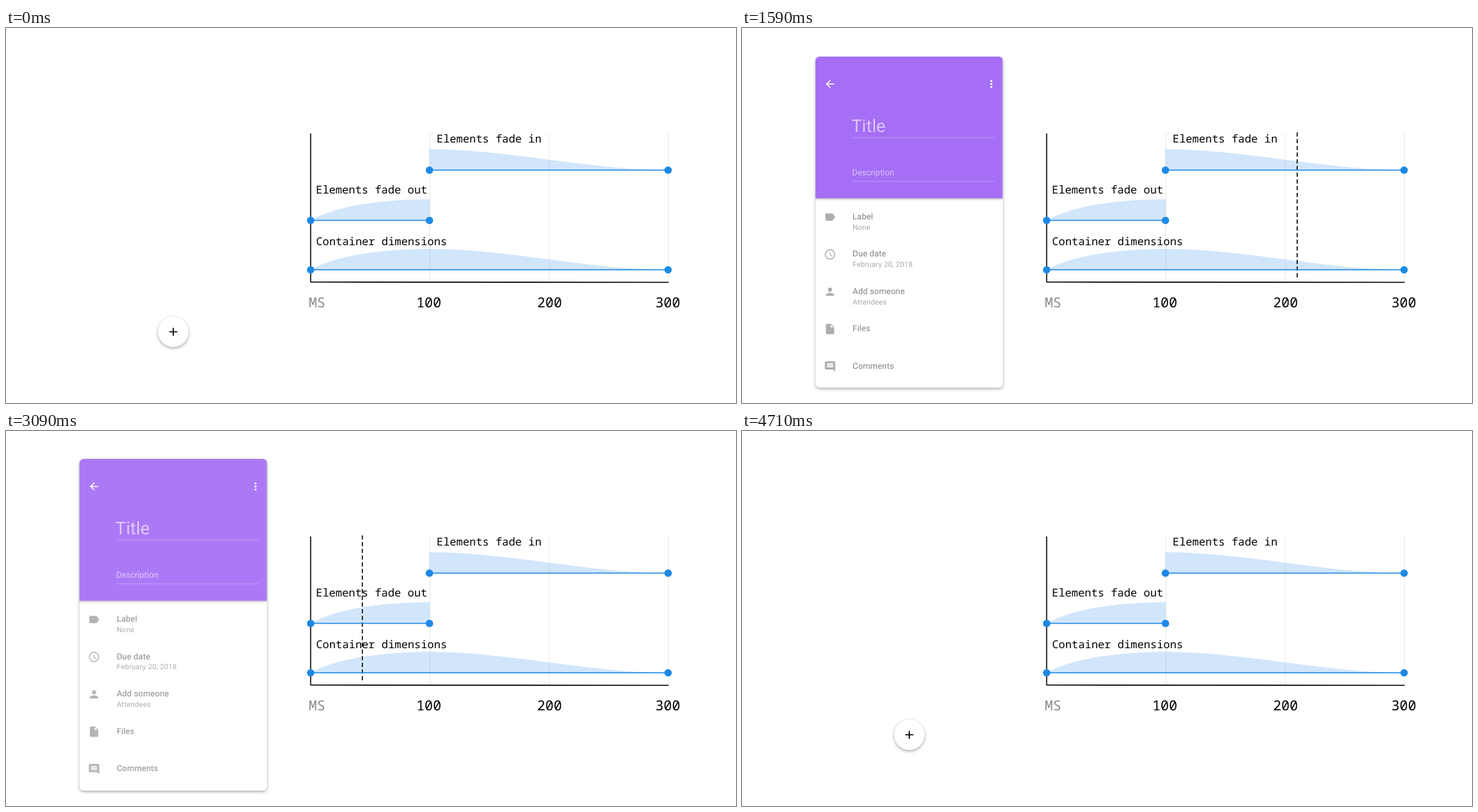
Write an HTML page that moves like this. It is 1043x537 px and loops after 4860 ms.

```html
<!DOCTYPE html>
<html lang="en">
<head>
<meta charset="utf-8">
<title>Container transform timing</title>
<style>
  html, body { margin: 0; width: 100%; height: 100%; overflow: hidden; background: #fff; }
  svg { display: block; text-rendering: geometricPrecision; }
  #chart { position: absolute; left: 0; top: 0; }
  #chart text { font: 15.6px "Roboto Mono", "Noto Sans Mono", monospace; }
  #chart .tick text { font-size: 19.8px; }
  #card {
    position: absolute; overflow: hidden; background: #fff;
    box-shadow: 0 2px 4px rgba(0,0,0,.3), 0 0 2px rgba(0,0,0,.12);
  }
  #page { position: absolute; left: 0; top: 0; width: 100%; }
  #page text { font: 16px Roboto, sans-serif; }
  #page .main { fill: #212121; letter-spacing: .15px; }
  #page .sub { fill: #666; font-size: 14px; letter-spacing: .25px; }
  #plus { position: absolute; transform: translate(-50%, -50%); }
</style>
</head>
<body>
<svg id="chart" width="1043" height="537" viewBox="0 0 1043 537">
  <path d="M605.5 150V363M776.5 150V363M946.5 150V363" stroke="#eee" stroke-width="1.4"/>
  <path d="M435.3 151V363.8L946.8 364.3" fill="none" stroke="#111" stroke-width="1.6"/>
  <g fill="#1a84e8" fill-opacity=".2">
    <path d="M605 203.5V173.5C718 173.5 833 203.5 946 203.5Z"/>
    <path d="M435 275.5C470 255.5 535 245.2 605.5 245.2V275.5Z"/>
    <path d="M435 346.3C470 326.3 535 316.2 605 316.2C718 316.2 833 346.3 946 346.3Z"/>
  </g>
  <g>
    <text x="615.3" y="164.3">Elements fade in</text>
    <text x="442.8" y="237.3">Elements fade out</text>
    <text x="443" y="310.5">Container dimensions</text>
  </g>
  <g class="tick">
    <text x="432.5" y="399.5" fill="#8a8a8a">MS</text>
    <g text-anchor="middle">
      <text x="604" y="399.5">100</text>
      <text x="776.5" y="399.5">200</text>
      <text x="945.5" y="399.5">300</text>
    </g>
  </g>
  <path id="cursor" d="M0 149.5V360" stroke="#000" stroke-width="1.5" stroke-dasharray="6 3.6"/>
  <path d="M605 203.5H946M435 275.5H605M435 346.3H946" stroke="#1e88e5" stroke-width="1.5"/>
  <g fill="#1e88e5">
    <circle cx="605" cy="203.5" r="5.3"/><circle cx="946" cy="203.5" r="5.3"/>
    <circle cx="435.3" cy="275.5" r="5.3"/><circle cx="605" cy="275.5" r="5.3"/>
    <circle cx="435.3" cy="346.3" r="5.3"/><circle cx="946" cy="346.3" r="5.3"/>
  </g>
</svg>

<div id="card">
  <svg id="page" viewBox="0 0 360 645">
    <rect width="360" height="645" fill="#fff"/>
    <rect width="360" height="273.2" fill="#6200ee" style="filter:drop-shadow(0 2px 2.5px rgba(0,0,0,.45))"/>
    <g fill="#fff">
      <path transform="translate(16 41)" d="M20 11H7.83l5.59-5.59L12 4l-8 8 8 8 1.41-1.41L7.83 13H20v-2z"/>
      <circle cx="338.3" cy="47" r="2"/><circle cx="338.3" cy="53" r="2"/><circle cx="338.3" cy="59" r="2"/>
      <g fill-opacity=".6">
        <text x="69" y="145" style="font-size:34px">Title</text>
        <text x="70.5" y="229">Description</text>
      </g>
      <path d="M71.5 156.4H344.7M71.5 240.6H344.7" stroke="#fff" stroke-opacity=".3" stroke-width="1.2"/>
    </g>
    <g id="rows"></g>
  </svg>
  <svg id="plus" viewBox="0 0 14 14"><path d="M7 0V14M0 7H14" stroke="#000" stroke-width="2"/></svg>
</div>

<script>
const $ = id => document.getElementById(id);
const clamp = v => Math.min(1, Math.max(0, v));
const lerp = (a, b, k) => a + (b - a) * k;

const rows = [
  ["Label", "None", "M17.63 5.84C17.27 5.33 16.67 5 16 5H5C3.9 5 3 5.9 3 7v10c0 1.1.9 2 2 2h11c.67 0 1.27-.33 1.63-.84L22 12z"],
  ["Due date", "February 20, 2018", "M12 2a10 10 0 1 0 0 20a10 10 0 1 0 0-20zm0 18a8 8 0 1 1 0-16a8 8 0 1 1 0 16zM12.5 7H11v6l5.25 3.15.75-1.23-4.5-2.67z"],
  ["Add someone", "Attendees", "M12 12a4 4 0 1 0 0-8a4 4 0 1 0 0 8zm0 2c-2.67 0-8 1.34-8 4v2h16v-2c0-2.66-5.33-4-8-4z"],
  ["Files", "", "M6 2c-1.1 0-2 .9-2 2v16c0 1.1.9 2 2 2h12c1.1 0 2-.9 2-2V8l-6-6zm7 7V3.5L18.5 9z"],
  ["Comments", "", "M22 4c0-1.1-.9-2-2-2H4c-1.1 0-2 .9-2 2v12c0 1.1.9 2 2 2h14l4 4zM18 14H6v-2h12zm0-3H6V9h12zm0-3H6V6h12z"]
];
$("rows").innerHTML = rows.map(([name, note, icon], i) => `
  <g transform="translate(0 ${72 * i})">
    <path transform="translate(16 297.4)" fill="#707070" fill-rule="evenodd" d="${icon}"/>
    <text class="main" x="71.5" y="313.7">${name}</text>
    <text class="sub" x="71.5" y="333.5">${note}</text>
  </g>`).join("");

// cubic-bezier(.4, 0, .2, 1), solved by bisection
function ease(x) {
  let lo = 0, hi = 1;
  for (let i = 0; i < 24; i++) {
    const s = (lo + hi) / 2, r = 1 - s;
    if (1.2 * r * r * s + .6 * r * s * s + s * s * s < x) lo = s; else hi = s;
  }
  return lo * lo * (3 - 2 * lo);
}

const LOOP = 4860, STEP = 30, HALF = 2250;

function draw(time) {
  const t = Math.floor(time % LOOP / STEP) * STEP;
  const closing = t >= 2700;
  const u = closing ? t - HALF : t;
  const run = clamp((u - 645) / 1350);

  $("cursor").setAttribute("transform", `translate(${435.3 + 511.4 * run})`);
  $("cursor").style.opacity = clamp((u - 480) / 150) * clamp((2460 - u) / 180);

  const p = closing ? 1 - ease(run) : ease(run);
  const w = lerp(44, 282, p);
  const px = v => v + "px";
  Object.assign($("card").style, {
    left: px(lerp(217, 98, p)), top: px(lerp(413, 16, p)),
    width: px(w), height: px(lerp(44, 503, p)),
    borderRadius: px(lerp(22, 5, p))
  });

  // old elements leave in the first 100 ms, new ones arrive in the next 200
  const ms = run ? run * 300 + 4 : 0;
  const leave = 1 - clamp(ms / 100), enter = clamp((ms - 100) / 200);
  $("page").style.opacity = closing ? leave : enter;
  Object.assign($("plus").style, {
    left: px(w / 2), top: px(w / 2), width: px(11.6 + 82 * p),
    opacity: closing ? enter : leave
  });
}

function tick() {
  draw(performance.now());
  requestAnimationFrame(tick);
}
tick();
</script>
</body>
</html>
```
